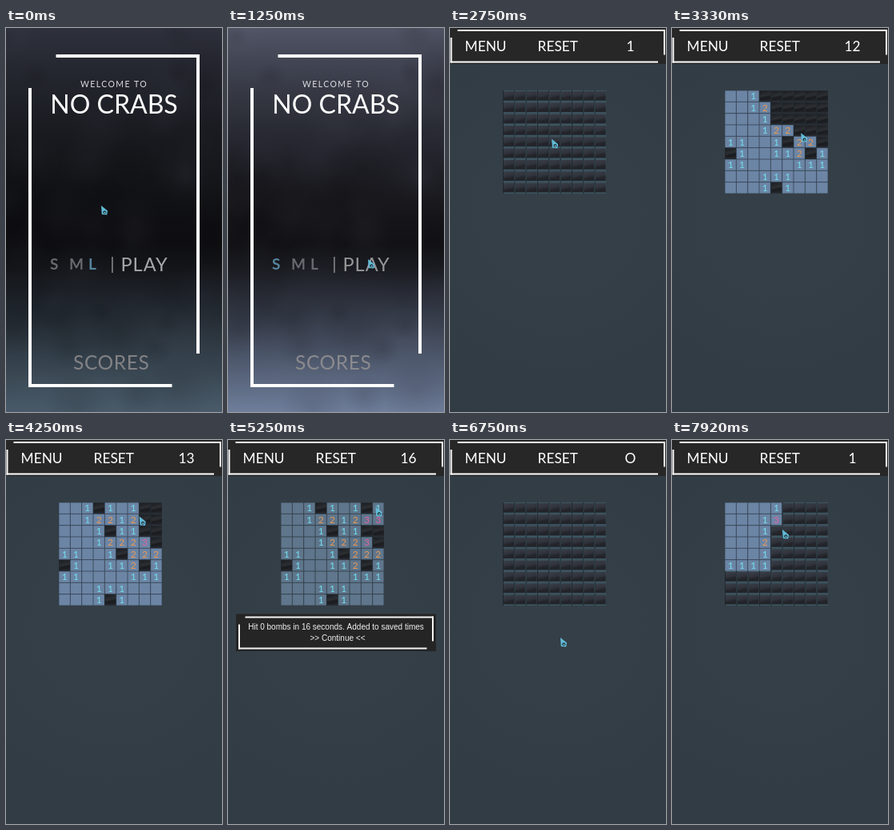
These frames come from a looping animation (270 by 480 pixels, 8 s). An HTML page with a canvas:

```html
<!DOCTYPE html>
<html lang="en">
<head>
<meta charset="utf-8">
<title>Minesweeper</title>
<style>
html, body { margin: 0; width: 100%; height: 100%; overflow: hidden; background: #343e46; }
canvas { display: block; width: 100vw; height: 100vh; }
</style>
</head>
<body>
<canvas id="stage"></canvas>
<script>
const W = 270, H = 480, LOOP = 8000, STEP = 250 / 3;
const PLAY_AT = 1330, SKIP_AT = 3170, POPUP_AT = 5250, RESTART_AT = 6750;
const N = 9, CELL = 129 / N, BX = 66, BY = 78;
const SANS = 'Lato, "Open Sans", sans-serif';

const canvas = document.getElementById('stage');
const ctx = canvas.getContext('2d');
const scale = window.devicePixelRatio || 1;
canvas.width = W * scale;
canvas.height = H * scale;

const lerp = (a, b, k) => a + (b - a) * k;
const clamp = (v, lo, hi) => Math.min(hi, Math.max(lo, v));
const blend = (a, b, k) => a.map((v, i) => Math.round(lerp(v, b[i], k)));
const grey = v => `rgb(${v},${v},${v + 3})`;

// ---- Game logic; a cell is row * 10 + column ----

const cells = Array.from({ length: N * N }, (_, i) => Math.floor(i / N) * 10 + i % N);
const row = cell => Math.floor(cell / 10);
const col = cell => cell % 10;
const neighbours = cell => cells.filter(n => n !== cell &&
  Math.abs(row(n) - row(cell)) < 2 && Math.abs(col(n) - col(cell)) < 2);

// Plays the clicks in order; records when each cell opens and where the cursor was.
function play(mines, clicks, clickTime) {
  const open = new Map(), stops = [];
  for (const cell of clicks) {
    if (open.has(cell)) continue;
    const at = clickTime(stops.length), todo = [cell];
    stops.push([at, BX + col(cell) * CELL + 4, BY + row(cell) * CELL + 5]);
    while (todo.length) {
      const c = todo.pop();
      if (open.has(c)) continue;
      const near = neighbours(c);
      const count = near.filter(n => mines.includes(n)).length;
      open.set(c, { at, count });
      if (!count) todo.push(...near);
    }
  }
  return { open, stops };
}

// Two openings, then a diagonal sweep over all safe cells towards the top right.
const mines = [3, 7, 24, 27, 28, 38, 45, 50, 57, 84];
const sweepKey = cell => 2 * row(cell) - col(cell);
const sweep = cells.filter(c => !mines.includes(c)).sort((a, b) => sweepKey(b) - sweepKey(a));
const first = play(mines, [44, 20, ...sweep], i => 2830 + 90 * i + 380 * Math.max(0, i - 16));
const second = play([15, 24, 25, 44, 61], [40], () => 7250);

function seconds(t) {
  if (t >= RESTART_AT) return Math.floor((t - 6420) / 1000);
  if (t < SKIP_AT) return Math.floor((t - PLAY_AT) / 1000);
  return clamp(13 + Math.floor((t - 4250) / 250), 12, 16);
}

const [, homeX, homeY] = second.stops[0];
const path = [
  [0, 119, 222], [580, 60, 290], [1200, 175, 289], [1580, 175, 289], [2050, 92, 300],
  [2700, 127, 138], ...first.stops, [6000, 169, 222], [6500, 138, 247],
  [RESTART_AT, 138, 247], [6900, homeX, homeY], [7600, homeX, homeY],
  [7900, 138, 112], [LOOP + 1, 138, 112]
];

// ---- Drawing helpers ----

function rect(x, y, w, h, fill) {
  ctx.fillStyle = fill;
  ctx.fillRect(x, y, w, h);
}

function text(str, x, y, font, fill, align = 'left', spacing = 0) {
  ctx.font = font;
  ctx.fillStyle = fill;
  ctx.textAlign = align;
  ctx.letterSpacing = spacing + 'px';
  ctx.fillText(str, x, y);
}

// Two open corners: top + right and left + bottom.
function corners(x, y, w, h, line, gapX, gapY, fill) {
  rect(x + gapX, y, w - gapX, line, fill);
  rect(x + w - line, y, line, h - gapY, fill);
  rect(x, y + gapY, line, h - gapY, fill);
  rect(x, y + h - line, w - gapX, line, fill);
}

// ---- Menu ----

let seed = 11;
const rnd = () => (seed = (seed * 16807) % 2147483647) / 2147483647;
const puffs = Array.from({ length: 60 }, () => ({
  x: rnd() * W, y: rnd() * H, r: 15 + rnd() * 40, light: rnd() < 0.5, speed: 4 + rnd() * 14
}));

// Dark in the middle, lighter towards both ends; k brightens the whole sky.
function fog(t, k) {
  const top = blend([46, 49, 60], [80, 84, 101], k);
  const dark = blend([14, 14, 17], [18, 18, 22], k);
  const bottom = blend([72, 90, 105], [110, 126, 155], k);
  const g = ctx.createLinearGradient(0, 0, 0, H);
  for (let s = 0; s <= 1; s += 0.0625) {
    const d = s - 0.58;
    const c = d < 0 ? blend(dark, top, (-d / 0.58) ** 1.6) : blend(dark, bottom, (d / 0.42) ** 1.1);
    g.addColorStop(s, `rgb(${c})`);
  }
  rect(0, 0, W, H, g);
  for (const p of puffs) {
    const x = p.x + p.speed * t / 1000, rgb = p.light ? '130,135,160' : '0,0,4';
    const puff = ctx.createRadialGradient(x, p.y, 0, x, p.y, p.r);
    puff.addColorStop(0, `rgba(${rgb},${p.light ? 0.04 : 0.1})`);
    puff.addColorStop(1, `rgba(${rgb},0)`);
    rect(x - p.r, p.y - p.r, p.r * 2, p.r * 2, puff);
  }
}

function drawMenu(t) {
  const k = Math.min(1, t / 1250);
  fog(t, k);
  corners(28, 33, 214, 416, 4, 45, 42, '#fff');
  corners(28, 33, 214, 416, 4, 34.5, 42, '#fff');
  rect(0, 0, 0, 0, '#fff');
  text('WELCOME TO', 93, 74, `400 10.5px ${SANS}`, '#dcdce0', 'left', 1.4);
  text('NO CRABS', 135, 106.5, `400 32px ${SANS}`, '#fff', 'center');

  const size = t < 640 ? 'L' : 'S';
  [...'SML'].forEach((s, i) =>
    text(s, 55 + 24 * i, 302, `700 19px ${SANS}`, s === size ? '#56849c' : '#66696f'));
  rect(132, 286, 1.8, 20, '#75787d');
  text('PLAY', 143.5, 303.5, `400 23.5px ${SANS}`, grey(lerp(168, 150, k)), 'left', 1);
  text('SCORES', 84, 427, `400 24.5px ${SANS}`, grey(lerp(130, 138, k)), 'left', 0.6);
}

// ---- Game ----

function coveredTile(x, y, lit) {
  rect(x, y, CELL, CELL, lit ? '#3d5661' : '#262c33');
  rect(x, y, 1, CELL, '#20272d');
  const g = ctx.createLinearGradient(x, y + 1, x + 3, y + CELL);
  g.addColorStop(0, lit ? '#3a3e48' : '#1a1c20');
  g.addColorStop(0.5, lit ? '#30333b' : '#2c2f33');
  g.addColorStop(0.7, lit ? '#23252b' : '#191b1e');
  g.addColorStop(1, '#212329');
  rect(x + 1, y + 1, CELL - 1.3, CELL - 2.6, g);
}

function drawBoard(open, t, lit, dim) {
  const digit = ['', '#72dfef', '#e89a58', '#e461a6'];
  for (const cell of cells) {
    const x = BX + col(cell) * CELL, y = BY + row(cell) * CELL, state = open.get(cell);
    if (!state || state.at > t) {
      coveredTile(x, y, lit);
      continue;
    }
    rect(x, y, CELL, CELL, dim ? '#36454f' : '#3d4c5f');
    rect(x + 0.5, y + 0.5, CELL - 1, CELL - 1, dim ? '#5f768c' : '#6c85a5');
    if (state.count)
      text(state.count, x + CELL / 2, y + 11.3, `400 12px ${SANS}`, digit[state.count], 'center');
  }
}

function drawHud(value) {
  const font = `400 17.3px ${SANS}`;
  rect(0, 0, W, 45, '#272727');
  corners(0.5, 2, 268.5, 41.5, 2, 9, 10, '#fff');
  text('MENU', 18.6, 29.3, font, '#fff');
  text('RESET', 109.6, 29.3, font, '#fff');
  // The zero is a full round one.
  text(value || 'O', 225.5, 29.3, font, '#fff', 'center');
}

function drawPopup() {
  const font = '10px "Liberation Sans", Arial, sans-serif';
  rect(10, 217.5, 250, 46.5, '#252525');
  corners(13, 220.5, 244, 41, 2, 8.5, 10, '#f4f4f4');
  text('Hit 0 bombs in 16 seconds. Added to saved times', 135, 236.5, font, '#f2f2f2', 'center');
  text('>> Continue <<', 137, 251, font, '#f2f2f2', 'center');
}

function drawGame(t) {
  const restarted = t >= RESTART_AT, value = seconds(t);
  const won = t >= POPUP_AT && !restarted;
  const g = ctx.createRadialGradient(W / 2, 230, 60, W / 2, 230, 290);
  g.addColorStop(0, '#353f47');
  g.addColorStop(1, '#313b43');
  rect(0, 0, W, H, g);
  drawHud(value);
  drawBoard((restarted ? second : first).open, t, value < 12, won);
  if (won) drawPopup();
}

// ---- Cursor ----

function dot(x, y, r, fill) {
  ctx.beginPath();
  ctx.arc(x, y, r, 0, Math.PI * 2);
  ctx.fillStyle = fill;
  ctx.fill();
}

function drawCursor(t) {
  const i = path.findIndex(p => p[0] > t);
  const [from, x0, y0] = path[i - 1], [to, x1, y1] = path[i];
  const k = (t - from) / (to - from), e = k * k * (3 - 2 * k);
  ctx.save();
  ctx.translate(lerp(x0, x1, e), lerp(y0, y1, e));
  ctx.beginPath();
  ctx.moveTo(0, 0);
  ctx.lineTo(8, 6.5);
  ctx.lineTo(7.2, 11.6);
  ctx.lineTo(0.8, 11);
  ctx.closePath();
  ctx.fillStyle = '#62bcd8';
  ctx.fill();
  dot(4.3, 8.2, 2, '#1d3540');
  dot(4.5, 8.6, 0.9, '#8fd0e2');
  ctx.restore();
}

let start;
function tick(now) {
  start ??= now;
  // The picture advances twelve times a second.
  const t = Math.floor(((now - start) % LOOP + 5) / STEP) * STEP % LOOP;
  ctx.setTransform(scale, 0, 0, scale, 0, 0);
  if (t + 5 < PLAY_AT) drawMenu(t);
  else drawGame(t + 5);
  drawCursor(t);
  requestAnimationFrame(tick);
}
requestAnimationFrame(tick);
</script>
</body>
</html>
```
